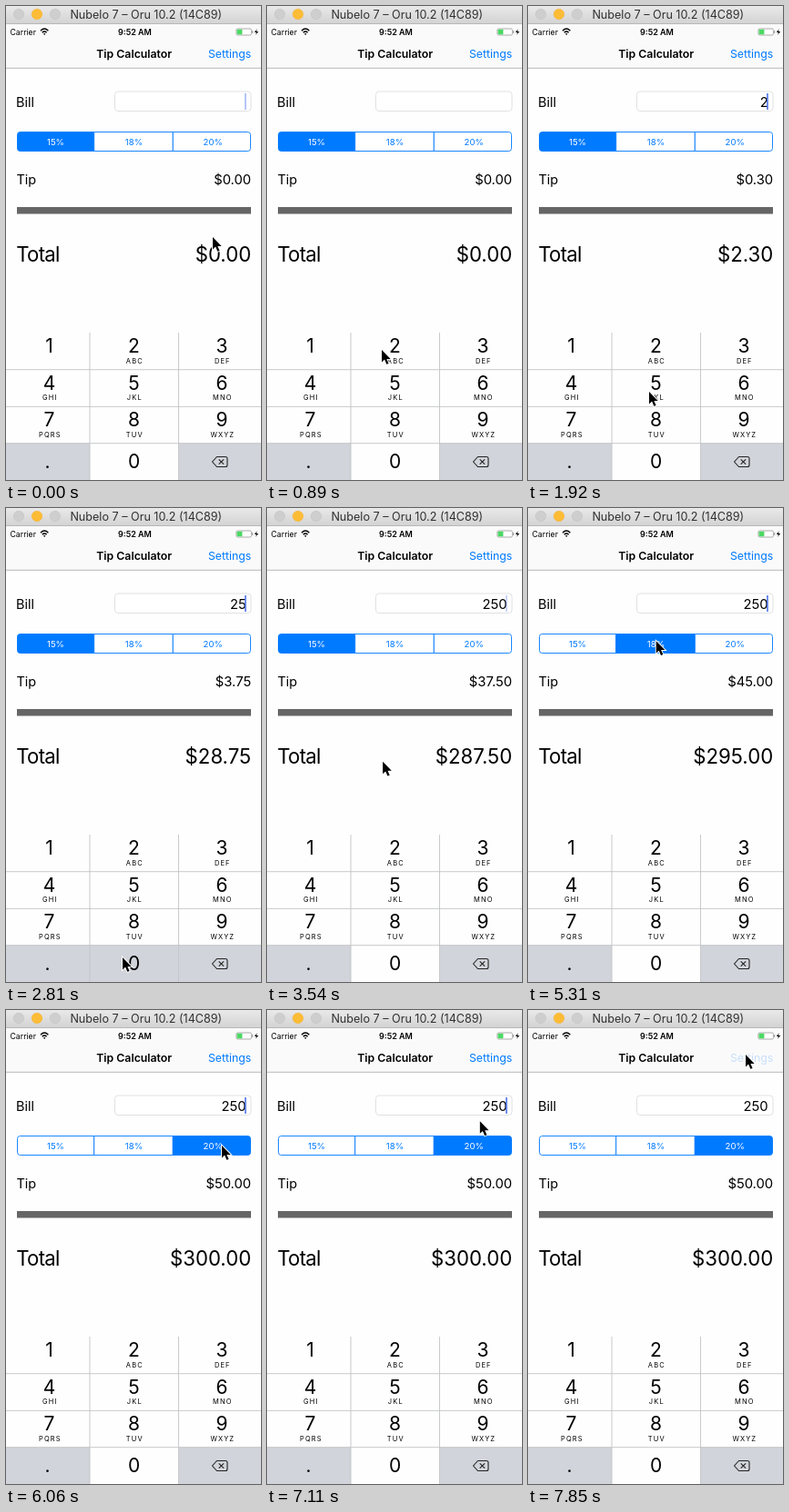
These frames come from a looping animation (280x521 px, 8 s). An HTML page:

```html
<!DOCTYPE html>
<html lang="en">
<head>
<meta charset="utf-8">
<title>Tip Calculator</title>
<style>
  html, body { margin: 0; width: 100%; height: 100%; overflow: hidden; background: #fefefe; }
  svg { display: block; width: 100vw; height: 100vh; }
  text { font-family: Inter, Roboto, "Liberation Sans", sans-serif; font-size: 14.5px; fill: #000; }
  .end { text-anchor: end; }
  .mid { text-anchor: middle; }
  .nav { font-size: 12.3px; }
  .bold { font-weight: 600; }
  .small { font-size: 9.6px; }
  .amount { font-size: 14.8px; }
  .large { font-size: 22.2px; }
  .digit { font-size: 21px; }
  .letters { font-size: 7.5px; letter-spacing: 1.1px; }
</style>
</head>
<body>
<svg id="stage" viewBox="0 0 280 521">
  <defs>
    <linearGradient id="chrome" x2="0" y2="1">
      <stop stop-color="#e9e9e9"/><stop offset="1" stop-color="#d2d2d2"/>
    </linearGradient>
  </defs>

  <rect width="280" height="68" fill="#fafafa"/>
  <rect width="280" height="20" fill="url(#chrome)"/>
  <path d="M0 19.5H280M0 68.3H280" stroke="#b8b8b8"/>
  <g stroke-width=".5">
    <circle cx="14" cy="9" r="5.7" fill="#cecece" stroke="#bebebe"/>
    <circle cx="34" cy="9" r="5.8" fill="#fdbc35" stroke="#f0b03a"/>
    <circle cx="54" cy="9" r="5.7" fill="#cecece" stroke="#bebebe"/>
  </g>
  <text class="mid" x="153.8" y="14" style="font-size:12.6px;fill:#303030">Nubelo 7 – Oru 10.2 (14C89)</text>

  <text x="4.5" y="31.5" style="font-size:8.7px">Carrier</text>
  <g fill="none" stroke="#000" stroke-width="1.4">
    <path d="M38 27.2Q42.2 23 46.4 27.2M39.8 29.2Q42.2 26.8 44.6 29.2"/>
    <path d="M42.2 32l-1.2-1.4q1.2-1 2.4 0z" fill="#000" stroke="none"/>
  </g>
  <text class="mid bold" x="141.5" y="31.5" style="font-size:9px">9:52 AM</text>
  <rect x="252.9" y="25" width="16.5" height="7" rx="1.4" fill="#fff" stroke="#999" stroke-width=".8"/>
  <rect x="253.6" y="25.7" width="5.8" height="5.6" rx=".6" fill="#4cd964"/>
  <path d="M270.7 27v3" stroke="#999"/>
  <path d="M275.6 25.2l-2.7 3.8h2l-.7 2.8 2.9-3.9h-2.1z"/>

  <text class="mid nav bold" x="140.7" y="56.5">Tip Calculator</text>
  <text class="end nav" id="settings" x="269.3" y="56.5" style="fill:#007aff">Settings</text>

  <text x="11" y="110.5">Bill</text>
  <rect x="119.5" y="94" width="149.5" height="21.5" rx="3.5" fill="#fff" stroke="#dedede" stroke-width=".9"/>
  <text class="end amount" id="bill" x="263.7" y="110.5"></text>
  <rect id="caret" x="262.2" y="96" width="1.5" height="18" fill="#4068ea"/>

  <g id="segments"></g>

  <text x="11.5" y="196">Tip</text>
  <text class="end amount" id="tip" x="269.2" y="196"></text>
  <rect x="12" y="221" width="257" height="7.5" fill="#666"/>
  <text class="large" x="11.2" y="281.2" letter-spacing="-.7">Total</text>
  <text class="end large" id="total" x="269.2" y="281.2"></text>

  <g id="keys"></g>
  <path d="M92 359V521M189.5 359V521M0 399.7H280M0 440.4H280M0 480.7H280" stroke="#c3c4c7" stroke-width=".9"/>
  <path d="M226.5 501l5-5.5h9.5q2 0 2 2v7q0 2-2 2h-9.5zM233.7 498.3l5.4 5.4M239.1 498.3l-5.4 5.4" fill="none" stroke="#222" stroke-width="1.1" stroke-linejoin="round"/>

  <g id="cursor">
    <path d="M1 1V14.4L4.1 11.6 6.3 16.8 8.6 15.9 6.4 10.9H10.7Z" stroke="#fff" stroke-width="1.9" paint-order="stroke"/>
  </g>
</svg>
<script>
const LOOP = 8000, TICK = 147.7;
const $ = id => document.getElementById(id);

function add(parent, tag, attrs, label = '') {
  const el = document.createElementNS('http://www.w3.org/2000/svg', tag);
  for (const k in attrs) el.setAttribute(k, attrs[k]);
  el.textContent = label;
  return parent.appendChild(el);
}

// Tip rate selector
const BLUE = '#007aff', rates = [15, 18, 20];
const centers = [54.5, 140.5, 227.2];
const shapes = [
  'M96.7 138.5H15.5q-3 0-3 3v15q0 3 3 3H96.7z',
  'M96.7 138.5H183.3v21H96.7z',
  'M183.3 138.5H265.5q3 0 3 3v15q0 3-3 3H183.3z'
];
const segments = rates.map((rate, i) => ({
  shape: add($('segments'), 'path', { d: shapes[i], stroke: BLUE, 'stroke-width': .9 }),
  label: add($('segments'), 'text', { class: 'mid small', x: centers[i], y: 153 }, rate + '%')
}));

// Keypad
const GREY = '#d1d4da', WHITE = '#fefefe';
const cols = [0, 92, 189.5, 280], keyCenters = [47.5, 140.5, 237];
const letters = ['', 'ABC', 'DEF', 'GHI', 'JKL', 'MNO', 'PQRS', 'TUV', 'WXYZ'];
const keys = {};
[...'123456789.0<'].forEach((key, i) => {
  const c = i % 3, y = 359 + Math.floor(i / 3) * 40.5;
  keys[key] = add($('keys'), 'rect', {
    x: cols[c], y, width: cols[c + 1] - cols[c], height: 41.5,
    fill: '.<'.includes(key) ? GREY : WHITE
  });
  const x = keyCenters[c] - (key === '.' ? 2 : 0);
  if (key !== '<') add($('keys'), 'text', { class: 'mid digit', x, y: y + (i < 9 ? 22 : 27.5) }, key);
  if (letters[i]) add($('keys'), 'text', { class: 'mid letters', x: x + .8, y: Math.floor(y + 34) }, letters[i]);
});

// Pointer stops: tick, x, y
const path = [
  [0, 226, 253], [4, 84, 402], [6, 125, 377], [10, 125, 377], [13, 132, 423],
  [16, 132, 423], [19, 127, 493], [20, 127, 493], [22, 130, 407], [27, 119, 40],
  [29, 132, 145], [34, 132, 145], [40, 236, 148], [43, 236, 148], [45, 231, 147],
  [46, 231, 147], [52, 238, 48], [54, 238, 48]
];

function pointer(n) {
  const i = path.findIndex(p => p[0] > n);
  const [n0, x0, y0] = path[i - 1], [n1, x1, y1] = path[i];
  const u = (n - n0) / (n1 - n0), e = u * u * (3 - 2 * u);
  return [x0 + (x1 - x0) * e, y0 + (y1 - y0) * e];
}

const clamp = v => Math.max(0, Math.min(1, v));

function caretAlpha(n) {
  if (n >= 10 && n <= 21) return 1; // solid while typing
  const p = ((n - 31) / 6.75 + 10) % 1;
  return Math.min(clamp((p - .33) / .15), clamp((1 - p) / .1));
}

function draw(time) {
  // The screen refreshes in coarse ticks
  const n = Math.min(53, Math.floor((time % LOOP + 6) / TICK));
  const bill = n < 10 ? '' : '250'.slice(0, n < 16 ? 1 : n < 20 ? 2 : 3);
  const chosen = n < 33 ? 0 : n < 40 ? 1 : 2;
  const tip = bill * rates[chosen] / 100;

  $('bill').textContent = bill;
  $('tip').textContent = '$' + tip.toFixed(2);
  $('total').textContent = '$' + (+bill + tip).toFixed(2);
  $('caret').setAttribute('opacity', caretAlpha(n));
  $('settings').setAttribute('opacity', n < 53 ? 1 : .2);

  segments.forEach(({ shape, label }, i) => {
    shape.setAttribute('fill', i === chosen ? BLUE : '#fff');
    label.style.fill = i === chosen ? '#fff' : BLUE;
  });

  const pressed = n === 8 || n === 9 ? '2' : n === 15 ? '5' : n === 19 ? '0' : '';
  for (const k of '250') keys[k].setAttribute('fill', k === pressed ? GREY : WHITE);

  $('cursor').setAttribute('transform', `translate(${pointer(n)})`);
}

let start;
function loop(now) {
  start ??= now;
  draw(now - start);
  requestAnimationFrame(loop);
}
draw(0);
requestAnimationFrame(loop);
</script>
</body>
</html>
```
